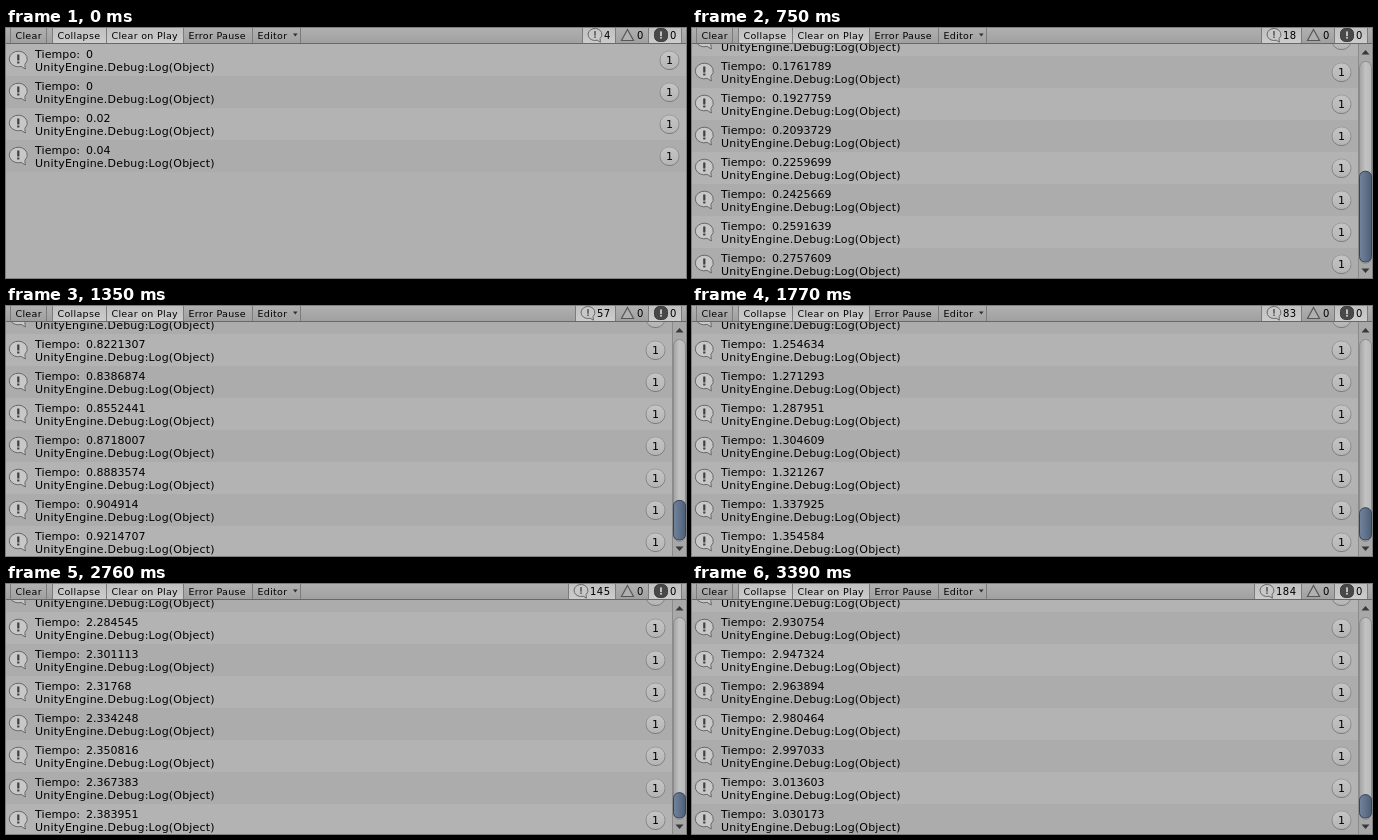
An HTML page with a canvas for the animation above (3570 ms loop, 680x250 px).

```html
<!DOCTYPE html>
<html lang="es">
<head>
<meta charset="utf-8">
<title>Console log</title>
<style>
html, body { margin: 0; width: 100%; height: 100%; overflow: hidden; background: #b0b0b0; }
canvas { display: block; }
</style>
</head>
<body>
<canvas id="stage" width="680" height="250"></canvas>
<script>
const ctx = document.getElementById('stage').getContext('2d');
const LOOP = 3570, ROW = 32, BAR = 16;
const FONT = '"DejaVu Sans", Verdana, sans-serif';

// Key points: playback ms, number of entries, seconds logged by the last entry
const keys = [
  [0, 4, 0.04], [540, 5, 0.06], [750, 18, 0.2757609], [1350, 57, 0.9214707],
  [2160, 107, 1.75438], [2760, 145, 2.383951], [3390, 184, 3.030173]
];

// Straight-line lookup from one key column to another
function lookup(value, from, to) {
  let k = 0;
  while (k < keys.length - 2 && value >= keys[k + 1][from]) k++;
  const a = keys[k], b = keys[k + 1];
  return a[to] + (value - a[from]) / (b[from] - a[from]) * (b[to] - a[to]);
}

// The list refreshes in beats of 210 ms, a few of them one tick shorter
const refreshes = [0, 540, 750, 870, 960];
for (let beat = 1; beat <= 12; beat++) {
  refreshes.push(refreshes.at(-1) + ([2, 6, 8].includes(beat) ? 180 : 210));
}

const countAt = ms => Math.round(lookup(refreshes.findLast(at => at <= ms), 0, 1));

function loggedTime(entry) {
  const t = Math.max(0, lookup(entry, 1, 2));
  return String(Number(t.toFixed(t < 1 ? 7 : 6)));
}

function rect(x, y, w, h, fill) {
  ctx.fillStyle = fill;
  ctx.fillRect(x, y, w, h);
}

function text(s, x, y, size, spacing = 0) {
  ctx.font = `${size}px ${FONT}`;
  ctx.letterSpacing = spacing + 'px';
  ctx.fillStyle = '#000';
  ctx.fillText(s, x, y);
}

function shape(fill, stroke, build, width = 1) {
  ctx.beginPath();
  build();
  ctx.fillStyle = fill;
  ctx.fill();
  if (stroke) {
    ctx.strokeStyle = stroke;
    ctx.lineWidth = width;
    ctx.stroke();
  }
}

function triangle(x, y, halfWidth, height, fill, stroke) {
  shape(fill, stroke, () => {
    ctx.moveTo(x, y);
    ctx.lineTo(x + halfWidth, y + height);
    ctx.lineTo(x - halfWidth, y + height);
    ctx.closePath();
  }, 1.2);
}

function gradient(x0, y0, x1, y1, ...colors) {
  const g = ctx.createLinearGradient(x0, y0, x1, y1);
  colors.forEach((c, i) => g.addColorStop(i / (colors.length - 1), c));
  return g;
}

function exclamation(x, y, scale, color) {
  rect(x - 1.1 * scale, y - 4.5 * scale, 2.2 * scale, 6 * scale, color);
  rect(x - 1.1 * scale, y + 2.5 * scale, 2.2 * scale, 2 * scale, color);
}

function bubble(x, y, scale, mark) {
  shape('#c8c8c8', '#686868', () => {
    ctx.ellipse(x, y, 9 * scale, 7.8 * scale, 0, 1.25, 0.75 + 2 * Math.PI);
    ctx.lineTo(x + 7 * scale, y + 10 * scale);
    ctx.closePath();
  });
  exclamation(x, y, scale, mark);
}

function badge(x, y) {
  shape(gradient(0, y - 10, 0, y + 10, '#c6c6c6', '#b4b4b4'),
    gradient(0, y - 10, 0, y + 10, '#a0a0a0', '#787878'),
    () => ctx.roundRect(x - 9.5, y - 9, 19, 18.5, 9));
  text('1', x - 3.5, y + 4, 11);
}

function drawRows(count) {
  const scrolled = count * ROW > 250 - BAR;
  const top = scrolled ? 252 - count * ROW : BAR;
  const width = scrolled ? 666 : 680;
  for (let i = Math.max(0, count - 8); i < count; i++) {
    const y = top + i * ROW;
    const selected = count === 5 && i === 2;
    rect(0, y, width, ROW, selected ? '#3163b9' : i % 2 ? '#acacac' : '#b3b3b3');
    bubble(12.3, y + 15, 1, '#404040');
    text('Tiempo:', 29, y + 14, 11, 0.1);
    text(loggedTime(i + 1), 80, y + 14, 11);
    text('UnityEngine.Debug:Log(Object)', 29, y + 27, 11, 0.2);
    badge(width - 16.5, y + 16);
  }
  if (scrolled) drawScrollbar(count);
}

function drawScrollbar(count) {
  rect(666, BAR, 14, 234, '#a8a8a8');
  rect(666, BAR, 1, 234, '#8a8a8a');
  shape(gradient(667, 0, 680, 0, '#a0a0a0', '#c2c2c2', '#b8b8b8'), '#8c8c8c',
    () => ctx.roundRect(667.5, 33.5, 12, 202, 6));
  triangle(673.5, 22, 4, 4.5, '#383838');
  triangle(673.5, 245, 4, -4.5, '#383838');

  const height = 16 + 184 * 234 / (count * ROW);
  shape(gradient(667, 0, 680, 0, '#74859c', '#61728c', '#4d5d76'), '#36445a',
    () => ctx.roundRect(667.5, 234 - height, 12, height, 5.5));
}

function button(x0, x1, pressed) {
  if (pressed) rect(x0, 0, x1 - x0, 15, gradient(0, 0, 0, 15, '#c0c0c0', '#cccccc'));
  rect(x0, 0, 1, 15, '#7c7c7c');
  rect(x1, 0, 1, 15, '#7c7c7c');
}

function drawToolbar(count) {
  rect(0, 0, 680, 15, gradient(0, 0, 0, 15, '#b0b0b0', '#a0a0a0'));
  rect(0, 15, 680, 1, '#686868');

  [['Clear', 4, 40], ['Collapse', 46, 100, true], ['Clear on Play', 100, 177, true],
   ['Error Pause', 177, 246], ['Editor', 246, 294]].forEach(([label, x0, x1, pressed]) => {
    button(x0, x1, pressed);
    text(label, x0 + 5.5, 11, 9.5, 0.3);
  });
  triangle(289.3, 8.5, 2.3, -3, '#303030');

  const digits = String(count);
  const left = 583 - 7 * digits.length;
  button(left, 609, true);
  button(609, 642, false);
  button(642, 675, true);
  bubble(left + 13, 6.5, 0.77, '#606060');
  text(digits, left + 22, 11, 10, 0.5);
  triangle(621.5, 1.5, 6, 11, '#b0b0b0', '#585858');
  text('0', 631, 11, 10);
  shape('#484848', '#3c3c3c', () => ctx.roundRect(648.5, 0.5, 13, 13, 5));
  exclamation(655, 7, 0.8, '#d0d0d0');
  text('0', 664, 11, 10);
}

const start = performance.now();
function frame() {
  const count = countAt((performance.now() - start) % LOOP);
  rect(0, 0, 680, 250, '#b0b0b0');
  drawRows(count);
  drawToolbar(count);
  requestAnimationFrame(frame);
}
frame();
</script>
</body>
</html>
```
